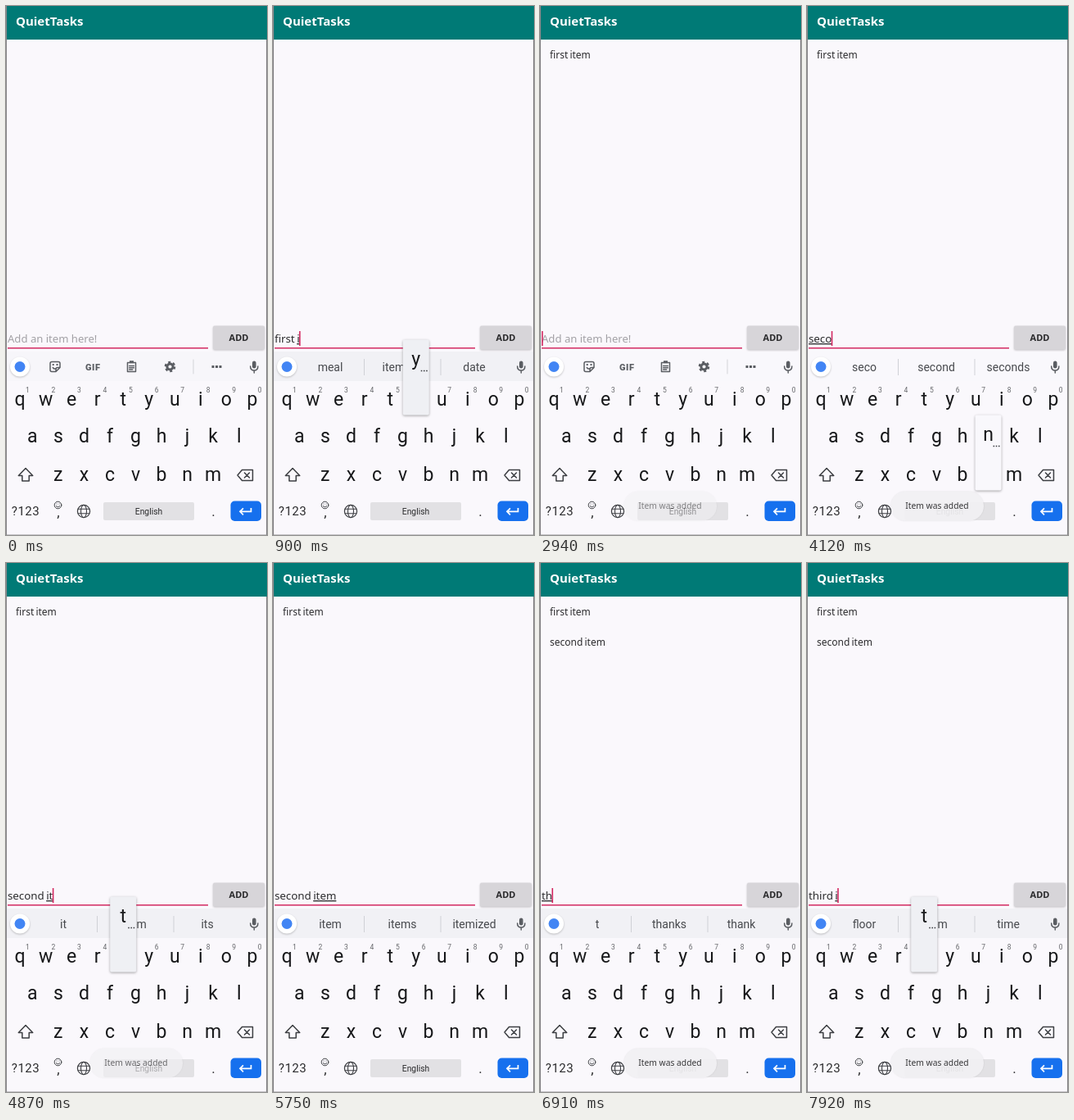
An HTML page that plays this animation: 319 px wide and 646 px high, repeating every 8000 ms.

```html
<!DOCTYPE html>
<html lang="en">
<head>
<meta charset="utf-8">
<title>To-do list</title>
<style>
  html, body { margin: 0; width: 100%; height: 100%; overflow: hidden; background: #faf8fc; }
  svg { display: block; width: 100%; height: 100%; }
  text { font-family: "Noto Sans", "Open Sans", sans-serif; fill: #2b2b2d; white-space: pre; }
  .mid { text-anchor: middle; }
  .kb text, .kb { font-family: Roboto, Arial, sans-serif; }
  .key { font-size: 23px; fill: #17181a; text-anchor: middle; }
  .digit { font-size: 8.5px; fill: #66676b; text-anchor: middle; }
  .sug text { font-size: 14px; fill: #47494d; text-anchor: middle; }
  .icon { fill: none; stroke: #5a5d62; stroke-width: 1.5; stroke-linejoin: round; stroke-linecap: round; }
  .solid { fill: #5a5d62; stroke: none; }
  .lift { filter: drop-shadow(0 1px 1.5px rgba(0, 0, 0, .35)); }
  .soft { filter: drop-shadow(0 1px 1px rgba(0, 0, 0, .22)); }
  .faint { filter: drop-shadow(0 .5px 1px rgba(0, 0, 0, .1)); }
  #list { font-size: 12px; word-spacing: -1px; }
  #entry { font-size: 13.3px; word-spacing: -1px; }
  #word { text-decoration: underline; }
</style>
</head>
<body>
<svg viewBox="0 0 319 646" preserveAspectRatio="none">
  <rect width="319" height="646" fill="#faf8fc"/>
  <path d="M.5 0v646M318.5 0v646" stroke="#88878b"/>
  <path d="M1 645.5h317" stroke="#c8c7cb"/>
  <rect x="1" width="318" height="41" fill="#007a76"/>
  <text x="12" y="24" font-size="15" font-weight="700" style="fill:#fff">QuietTasks</text>

  <g id="list">
    <text x="12" y="64">first item</text>
    <text x="12" y="101">second item</text>
  </g>

  <text id="hint" x="2" y="411" font-size="13.1" style="fill:#a3a1a6">Add an item here!</text>
  <text id="entry" x="2" y="411"><tspan id="done"></tspan><tspan id="word"></tspan></text>
  <rect x="2" y="417" width="245" height="1.5" fill="#d32a62"/>
  <rect id="cursor" y="397" width="1.6" height="18" fill="#d32a62"/>
  <rect id="add" class="soft" x="253" y="390.5" width="63" height="29" rx="2"/>
  <text class="mid" x="284.5" y="409" font-size="11" font-weight="700">ADD</text>

  <g class="kb">
    <rect id="strip" x="1" y="422" width="317" height="36"/>
    <circle class="soft" cx="17" cy="440.5" r="12" fill="#fff"/>
    <circle cx="17" cy="440.5" r="6.5" fill="#4285f4"/>

    <g id="tools" class="icon">
      <path d="M56 434.5h8a2 2 0 0 1 2 2v5l-5 5h-5a2 2 0 0 1-2-2v-8a2 2 0 0 1 2-2zM66 441.5h-3a2 2 0 0 0-2 2v3M57.3 441.5q1.2 2 3 1.5"/>
      <path class="solid" d="M56.7 437h2v2h-2zM61.5 437h2v2h-2z"/>
      <text class="solid mid" x="106.3" y="444.5" font-size="11" font-weight="900" letter-spacing=".6">GIF</text>
      <path d="M148.5 435.5h10v11h-10zM150.7 439.5h5.6M150.7 441.7h5.6M150.7 443.9h4"/>
      <path class="solid" d="M151 433.2h5v3h-5z"/>
      <circle cx="200.5" cy="440.5" r="3.6" stroke-width="3"/>
      <circle cx="200.5" cy="440.5" r="5.7" stroke-width="2.2" stroke-linecap="butt" stroke-dasharray="3 2.97"/>
      <path d="M229 432v17" stroke="#d3d4d8" stroke-width="1"/>
      <path class="solid" d="M251.5 439h3v3h-3zM256 439h3v3h-3zM260.5 439h3v3h-3z"/>
    </g>

    <g id="sugs" class="sug">
      <path d="M111.5 431v20M205 431v20" stroke="#cfd1d6"/>
      <text x="70" y="446"></text><text x="158" y="446"></text><text x="246" y="446"></text>
    </g>

    <g class="icon">
      <rect class="solid" x="301" y="433.5" width="4.6" height="9" rx="2.3"/>
      <path d="M298.7 440q0 5 4.6 5t4.6-5M303.3 445v3"/>
    </g>

    <g id="keys"></g>

    <g class="icon" style="stroke:#3c3e42">
      <path d="M24 564.5l-8.7 9h4.5v6.5h8.4v-6.5h4.5z"/>
      <path d="M288.5 566.5h13v13h-13l-5.5-6.5zM291.5 570l6 6M297.5 570l-6 6"/>
      <circle cx="95" cy="617" r="7.6" stroke-width="1.2"/>
      <ellipse cx="95" cy="617" rx="3.5" ry="7.6" stroke-width="1.1"/>
      <path d="M88.2 614.3h13.6M88.2 619.7h13.6" stroke-width="1.1"/>
      <circle cx="63.5" cy="609.5" r="4.3" stroke-width="1"/>
      <path d="M61.3 610.8q2.2 2.4 4.4 0M62 608h.1M65 608h.1" stroke-width="1"/>
    </g>
    <text class="mid" x="24" y="622" font-size="15" letter-spacing=".5">?123</text>
    <text class="mid" x="64" y="624" font-size="17">,</text>
    <text class="mid" x="253.5" y="623" font-size="17">.</text>
    <rect x="119" y="606" width="111" height="22" rx="2" fill="#e2e1e4"/>
    <text class="mid" x="174.5" y="620.5" font-size="10.3">English</text>
    <rect x="274.5" y="604.5" width="37.5" height="24.5" rx="5" fill="#1670ee"/>
    <path d="M299.5 613v4.3h-13M290 613.3l-4 4 4 4" fill="none" stroke="#fff" stroke-width="1.7"/>
  </g>

  <g id="toast">
    <rect class="faint" x="102.5" y="593" width="113.5" height="35.5" rx="17.75" fill="#f2f1f4"/>
    <text x="120.3" y="614" font-size="10.3">Item was added</text>
  </g>

  <g id="popup" class="kb">
    <rect class="lift" x="-16" y="-73" width="32" height="92" rx="2"/>
    <text class="key" y="-42"></text>
    <path d="M6-35h1.6M9.2-35h1.6M12.4-35h1.6" stroke="#3c3e42" stroke-width="1.5"/>
  </g>
</svg>

<script>
const LOOP = 8000;
const ADDED = [2650, 6030];   // moments an item joins the list
const PRESSED = [2510, 5880]; // moments the button is held
const HIDDEN = [0, 5750, 5880];
const PALE = [2650, 4570];    // strip stays light while the toolbar gives way
const ROWS = [['qwertyuiop', 17, 480.5], ['asdfghjkl', 32.3, 525.5], ['zxcvbnm', 63.8, 572.5]];
const PITCH = 31.55;

// time, typed text, key bubble, suggestions
const STEPS = [
  [0, '', '', ''],
  [140, 'f', 'i', 'f|for|from'],
  [290, 'fi', 'r', 'fi|find|fine'],
  [440, 'firs', '', 'first|fire|firm'],
  [590, 'first', 't', 'first|firsts|firstly'],
  [750, 'first ', 'i', 'meal|item for|date'],
  [900, 'first i', 'y', 'meal|item for|date'],
  [1050, 'first iy', 'e', 'iy|it|is'],
  [1350, 'first iyem', '', 'iyem|item|items'],
  [1930, 'first item', '', 'item|items|itemized'],
  [2210, 'first item ', '', 'in|is|on'],
  [2510, 'first item ', '', 'in|is|on'],
  [2650, '', '', ''],
  [2800, '', '', ''],
  [2940, '', '', ''],
  [3090, '', '', ''],
  [3540, '', 's', ''],
  [3690, 's', 'e', 's|so|see'],
  [3830, 'se', '', 'se|see|send'],
  [3980, 'sec', 'o', 'sec|second|secret'],
  [4120, 'seco', 'n', 'seco|second|seconds'],
  [4270, 'secon', '', 'secon|second|seconds'],
  [4420, 'second', '', 'second|seconds|secondary'],
  [4570, 'second ', '', 'one|time|item'],
  [4720, 'second i', 'i', 'one|time|item'],
  [4870, 'second it', 't', 'it|item|its'],
  [5010, 'second ite', 'e', 'ite|item|items'],
  [5160, 'second item', 'm', 'item|items|itemized'],
  [5300, 'second item', '', 'item|items|itemized'],
  [5750, 'second item', '', 'item|items|itemized'],
  [5880, 'second item', '', 'item|items|itemized'],
  [6030, '', '', ''],
  [6180, '', '', ''],
  [6320, '', '', ''],
  [6470, '', '', ''],
  [6620, '', 't', ''],
  [6760, 't', 'h', 't|thanks|thank'],
  [6910, 'th', '', 't|thanks|thank'],
  [7060, 'thi', 'i', 'this|think|third'],
  [7200, 'thir', 'r', 'third|thirty|thirsty'],
  [7350, 'third', '', 'third|thirds|thirdly'],
  [7490, 'third ', '', 'floor|item|time'],
  [7640, 'third ', 'i', 'floor|item|time'],
  [7780, 'third i', '', 'floor|item|time'],
  [7920, 'third i', 't', 'floor|item|time']
];

const $ = id => document.getElementById(id);
const clamp = v => Math.max(0, Math.min(1, v));
const show = (el, on) => el.setAttribute('visibility', on ? 'visible' : 'hidden');
const keyAt = {};

function label(x, y, cls, str) {
  const el = document.createElementNS('http://www.w3.org/2000/svg', 'text');
  el.setAttribute('x', x);
  el.setAttribute('y', y);
  el.setAttribute('class', cls);
  el.textContent = str;
  $('keys').append(el);
}

ROWS.forEach(([letters, x0, y], row) => [...letters].forEach((ch, i) => {
  const x = x0 + i * PITCH;
  keyAt[ch] = [x, y];
  label(x, y + 7.5, 'key', ch);
  if (!row) label(x + 9.3, 471.5, 'digit', (i + 1) % 10);
}));

function toastAlpha(t) {
  const start = ADDED.filter(a => a <= t).pop();
  if (start === undefined) return 0;
  const age = t - start;
  return 0.93 * Math.min(clamp((age - 100) / 340), clamp((2500 - age) / 400));
}

function stripColor(t, sug) {
  if (t >= PALE[0] && t < PALE[1]) return '#f9f8fc';
  return sug ? '#f1f1f5' : '#f7f6fa';
}

function draw([t, text, pop, sug]) {
  const cut = text.lastIndexOf(' ') + 1;
  $('done').textContent = text.slice(0, cut);
  $('word').textContent = text.slice(cut);
  show($('hint'), !text);
  show($('cursor'), !HIDDEN.includes(t));
  $('cursor').setAttribute('x', 2 + (text ? $('entry').getComputedTextLength() - 0.6 : 0));

  [...$('list').children].forEach((el, i) => show(el, t >= ADDED[i]));
  $('add').setAttribute('fill', PRESSED.includes(t) ? '#c6c4c8' : '#d7d5d9');
  $('toast').setAttribute('opacity', toastAlpha(t));

  show($('tools'), !sug);
  show($('sugs'), sug);
  $('strip').setAttribute('fill', stripColor(t, sug));
  const words = sug.split('|');
  $('sugs').querySelectorAll('text').forEach((el, i) => el.textContent = words[i] || '');

  show($('popup'), pop);
  if (pop) {
    const [x, y] = keyAt[pop];
    $('popup').setAttribute('transform', `translate(${x} ${y})`);
    $('popup').querySelector('rect').setAttribute('fill', y > 500 ? '#f9f8fc' : '#eff0f4');
    $('popup').querySelector('text').textContent = pop;
  }
}

let last;
function tick() {
  const t = performance.now() % LOOP;
  const step = STEPS.filter(s => s[0] <= t).pop();
  if (step !== last) draw(last = step);
  requestAnimationFrame(tick);
}
tick();
</script>
</body>
</html>
```
